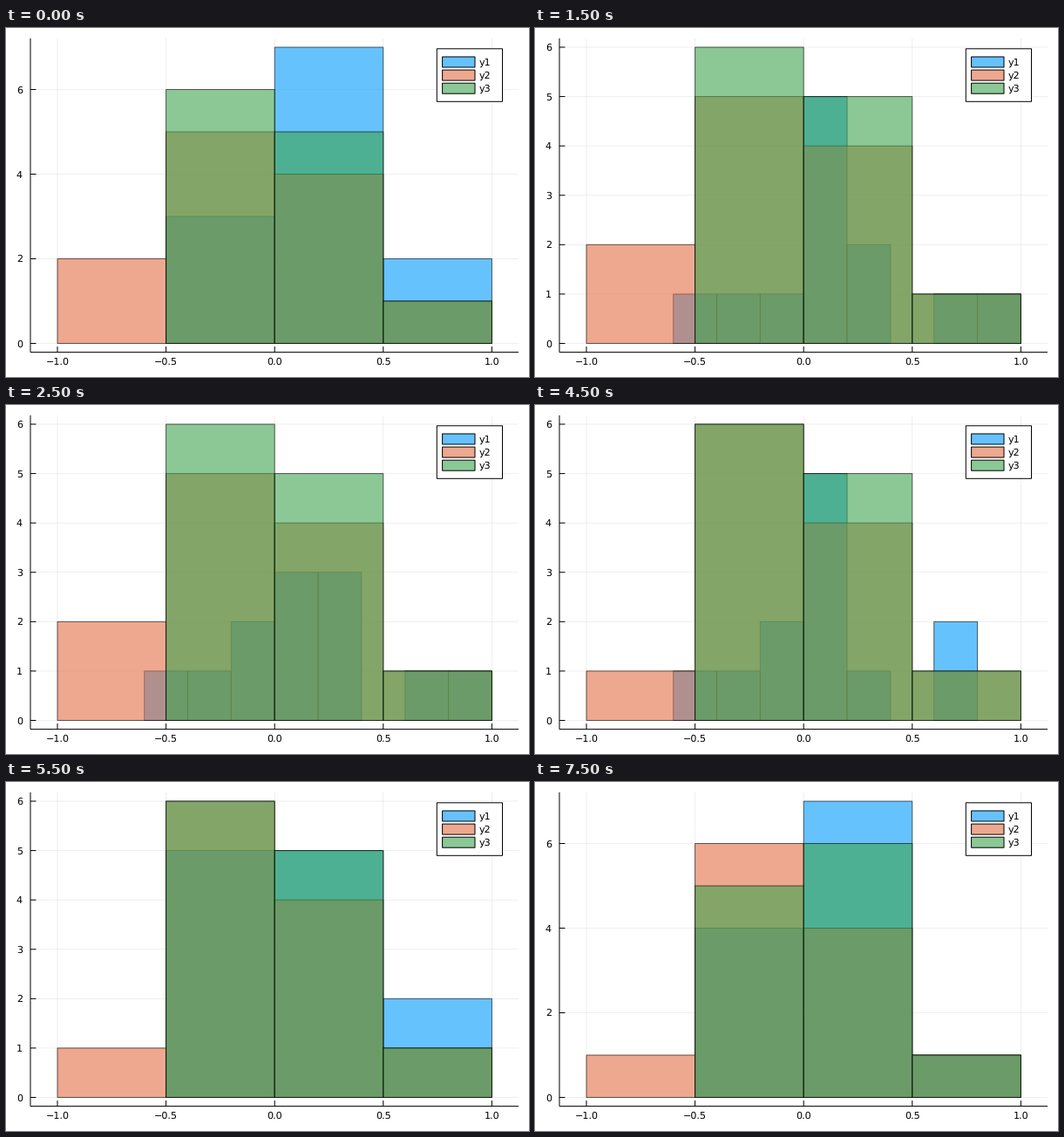
Write a matplotlib script that moves like this. It is 600 by 400 pixels and loops after 8000 ms.

```python
import matplotlib.pyplot as plt
from matplotlib.animation import FuncAnimation
from matplotlib.patches import Rectangle

W, H, DPI = 600, 400, 100
PX = 72 / DPI                       # one pixel in points
LEFT, RIGHT, TOP, BOTTOM = 28, 588, 11.8, 371.6
BASE, PEAK = 361.5, 22.0            # heights of zero and of the tallest bar
X0, X_UNIT = 308.2, 249.2
COLORS = [(0, 0.604, 0.980), (0.889, 0.436, 0.278), (0.242, 0.643, 0.304)]
ALPHA = 0.6
SAMPLES = 12

# Bars of y1 on both sides of zero at each step; the rest follows from the sum.
Y1_KEYS = [(3, 7), (1, 4), (1, 5), (2, 3), (1, 6), (2, 5), (5, 5), (4, 6), (4, 7)]

plt.rcParams["font.family"] = "DejaVu Sans"
plt.rcParams["text.hinting"] = "none"


def histograms(step):
    """Return (first edge, bin width, counts) of y1, y2 and y3."""
    low, high = Y1_KEYS[step]
    rest = SAMPLES - low - high
    late, last = int(step >= 5), int(step >= 8)   # one sample changes its bin
    if 1 <= step <= 5:
        y1 = (-0.6, 0.2, [1, 1, low, high, rest - 4, 0, 1 + late, 1 - late])
    else:
        y1 = (-0.5, 0.5, [low, high, rest])
    y2 = (-1, 0.5, [2 - late, 5 + late, 4, 1])
    y3 = (-0.5, 0.5, [6 - last, 5 + last, 1])
    return y1, y2, y3


fig = plt.figure(figsize=(W / DPI, H / DPI), dpi=DPI, facecolor="white")
ax = fig.add_axes([0, 0, 1, 1])


def line(xs, ys, color="black", width=1.0):
    ax.plot(xs, ys, color=color, lw=width * PX, snap=False,
            solid_capstyle="butt")


def box(x, y, w, h, face, edge="black"):
    ax.add_patch(Rectangle((x, y), w, h, facecolor=face, edgecolor=edge,
                           lw=PX, snap=False, joinstyle="miter", zorder=3))


def label(x, y, text, ha):
    ax.text(x, y, text, fontsize=8, ha=ha, va="baseline", zorder=4)


def draw_axes(top_count, unit):
    grid, tick = (0, 0, 0, 0.1), 6.5
    for k in range(-2, 3):
        x = X0 + k / 2 * X_UNIT
        line([x, x], [TOP, BOTTOM], grid, 0.6)
        line([x, x], [BOTTOM, BOTTOM - tick])
        label(x, 386, f"{k / 2:.1f}".replace("-", "\u2212"), "center")
    for v in range(0, top_count + 1, 2 if top_count > 6 else 1):
        y = BASE - v * unit
        line([LEFT, RIGHT], [y, y], grid, 0.6)
        line([LEFT, LEFT + tick], [y, y])
        label(19, y + 4, str(v), "right")
    line([LEFT, LEFT], [TOP, BOTTOM])
    line([LEFT, RIGHT], [BOTTOM, BOTTOM])


def draw_bars(hist, color, unit):
    start, width, counts = hist
    for k, n in enumerate(counts):
        if n:
            box(X0 + (start + k * width) * X_UNIT, BASE - n * unit,
                width * X_UNIT, n * unit, (*color, ALPHA), (0, 0, 0, ALPHA))


def draw_legend():
    box(494.3, 23.8, 75.2, 60.5, "white")
    for k, color in enumerate(COLORS):
        y = 39 + 15.1 * k
        box(500.6, y - 6, 37.4, 12, (*color, ALPHA))
        label(543, y + 4, f"y{k + 1}", "left")


def draw(i):
    ax.clear()
    ax.set_xlim(0, W)
    ax.set_ylim(H, 0)
    ax.axis("off")
    hists = histograms((i + 1) // 2)
    top_count = max(max(counts) for _, _, counts in hists)
    unit = (BASE - PEAK) / top_count
    draw_axes(top_count, unit)
    for hist, color in zip(hists, COLORS):
        draw_bars(hist, color, unit)
    draw_legend()
    return []


anim = FuncAnimation(fig, draw, frames=16, interval=500, repeat=True,
                     repeat_delay=0, init_func=lambda: draw(0))
plt.show()
```
